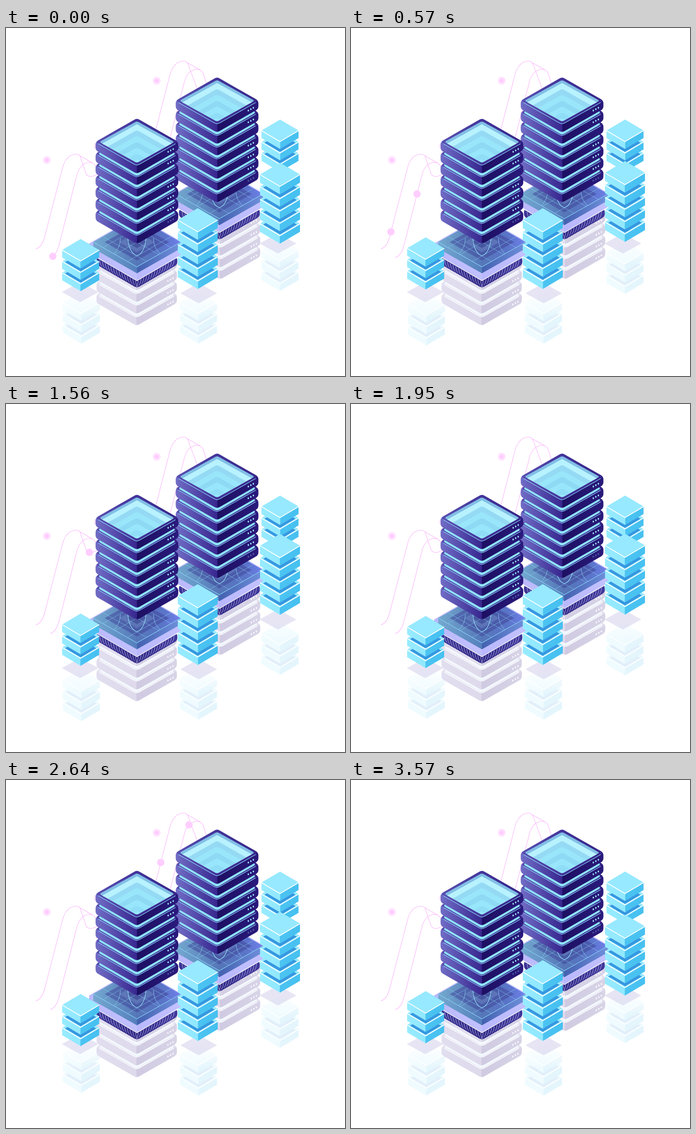
These frames come from a looping animation (738 px wide and 759 px high, 3.6 s). An HTML page:

```html
<!DOCTYPE html>
<html lang="en">
<head>
<meta charset="utf-8">
<title>Isometric servers</title>
<style>
  html, body { margin: 0; width: 100%; height: 100%; overflow: hidden; background: #fff; }
  svg { display: block; }
</style>
</head>
<body>
<svg id="stage" width="738" height="759" viewBox="0 0 738 759"></svg>
<script>
const LOOP = 3600, DOT_SPEED = 0.252, FLOOR_GAP = 25.5;
const stage = document.getElementById('stage');

// Horizontal gradients; two faces meet at a hard stop in the middle.
const gradient = (id, stops) => `<linearGradient id="${id}">` +
  stops.map(([at, color]) => `<stop offset="${at}" stop-color="${color}"/>`).join('') + '</linearGradient>';
const faces = (id, a, b, c, d) => gradient(id, [[0, a], [0.5, b], [0.5, c], [1, d]]);

const defs = `<defs>
  ${faces('cube', '#98ebff', '#90e8ff', '#4cc4f2', '#46c0f0')}
  ${faces('slab', '#716dc6', '#38278f', '#1d0f62', '#2a1a7c')}
  ${faces('ghost', '#e1deef', '#dedaec', '#cfcae1', '#d8d4e7')}
  ${faces('block', '#74a8d0', '#5580bd', '#4461b0', '#6f90dc')}
  ${faces('plate', '#bab8fb', '#c1c0ff', '#b9b8ff', '#c4c2ff')}
  ${faces('socket', '#3d3698', '#2c247f', '#2e2784', '#40389c')}
  ${gradient('rim', [[0, '#5a50b0'], [0.5, '#43349b'], [1, '#352589']])}
  ${gradient('deck', [[0, '#73a9cf'], [0.5, '#5577b8'], [0.8, '#5a74c8'], [1, '#7080ec']])}
  <linearGradient id="fade" x2="0" y2="1">
    <stop offset="0" stop-color="#fff"/><stop offset="1" stop-color="#fff" stop-opacity="0"/>
  </linearGradient>
  <clipPath id="glass"><path d="${diamond(0, 0, 82, 45.5, 5)}"/></clipPath>
</defs>`;

// Closed polygon with corners rounded over r pixels.
function polygon(points, r = 0) {
  if (!r) return 'M' + points.join('L') + 'Z';
  const toward = ([x, y], [u, v]) => {
    const k = r / Math.hypot(u - x, v - y);
    return [x + (u - x) * k, y + (v - y) * k];
  };
  const n = points.length;
  return points.map((p, i) =>
    `${i ? 'L' : 'M'}${toward(p, points[(i + n - 1) % n])}Q${p} ${toward(p, points[(i + 1) % n])}`).join('') + 'Z';
}
function diamond(x, y, w, h, r) {
  return polygon([[x - w, y], [x, y - h], [x + w, y], [x, y + h]], r);
}
const fill = (d, color, more = '') => `<path d="${d}" fill="${color}" ${more}/>`;
const line = (d, color, width, more = '') =>
  `<path d="${d}" fill="none" stroke="${color}" stroke-width="${width}" ${more}/>`;
const prism = (x, y, w, h, t, paint, r) => fill(polygon(
  [[x - w, y], [x, y - h], [x + w, y], [x + w, y + t], [x, y + h + t], [x - w, y + t]], r), paint);
const frontEdge = (x, y, w, h, r = 0) => {
  const k = h / w;
  return `M${x - w + r} ${y + r * k}L${x - r} ${y + h - r * k}Q${x} ${y + h} ${x + r} ${y + h - r * k}L${x + w - r} ${y + r * k}`;
};
const move = (x, y, body) => `<g transform="translate(${x} ${y})">${body}</g>`;

function cubes(x, top, w, count) {
  const h = w * 0.592, t = w * 0.4, step = w * 0.617;
  let out = '';
  for (let i = count - 1; i >= 0; i--) {
    const y = top + h + i * step;
    out += prism(x, y, w, h, t, 'url(#cube)') + fill(diamond(x, y, w, h), '#97e9ff');
    if (i) out += fill(diamond(x, y + 1.5, w * 0.84, h * 0.84), '#3797e0');
    out += line(frontEdge(x, y, w, h), '#fff', 1.8);
  }
  return out;
}

function leds(y, color, opacity) {
  return [68, 73.5, 79].map((x, i) =>
    `<ellipse cx="${x}" cy="${y - i * 3}" rx="1.5" ry="2" fill="${color}" opacity="${opacity}"/>`).join('');
}

function tower() {
  const w = 90, h = 51.5;
  let out = '';
  for (let i = 6; i >= 0; i--) {
    const y = i * FLOOR_GAP;
    out += prism(0, y, w, h, 18, 'url(#slab)', 6) + fill(diamond(0, y, w, h, 6), 'url(#rim)');
    if (i) out += fill(diamond(0, y, 85, 49.5, 6), '#8fe4fd');
    out += line(frontEdge(0, y + 0.5, w, h, 6), '#8bd9fa', 1.2);
    if (i !== 2) out += leds(y + 21.5, '#a5efff', i === 6 ? 0.35 : 1);
  }
  let inside = fill(diamond(0, 0, 82, 45.5), '#82bfe6') + fill(diamond(0, 7, 82, 45.5), '#b8f2ff');
  for (let k = 1; k < 4; k++) {
    const y = k * FLOOR_GAP;
    inside += fill(diamond(0, y, w, h, 6), '#86d0ef', `opacity="${0.85 - k * 0.15}"`) +
      fill(diamond(0, y + 9, 86, 48, 6), '#9ae9fd', 'opacity=".85"');
  }
  return out + `<g clip-path="url(#glass)">${inside}</g>`;
}

function towerGhost() {
  const w = 87.5, h = 50;
  let out = '';
  for (let k = 0; k < 5; k++) {
    const y = -k * FLOOR_GAP;
    out += prism(0, y, w, h, 18, 'url(#ghost)', 6) + fill(diamond(0, y, w, h, 6), '#e6e3f1') +
      fill(diamond(0, y, 83, 48, 6), '#f3f8fd') + line(frontEdge(0, y, w, h, 6), '#fff', 1.3) +
      leds(y + 21.5, '#fff', 0.9);
  }
  return out;
}

function base() {
  let out = prism(0, 34, 88, 51, 15, 'url(#socket)', 6);
  for (let i = 0; i < 14; i++) {
    for (const side of [-1, 1]) {
      const x = side * (3 + i * 6), y = 84 - i * 3.45;
      out += line(`M${x} ${y}q${-side} 10 ${-side * 5} 14`, '#dcd8ff', 0.8);
      if (i < 11) out += line(`M${x - side * 5} ${y + 16}q${-side * 2} 7 ${-side * 6} 13`, '#fff', 0.8, 'opacity=".5"');
    }
  }
  out += prism(0, 3, 104, 60, 20, 'url(#plate)') +
    line('M-88 33L0 84L88 33', '#fff', 1.6) +
    prism(0, 0, 95, 54, 14, 'url(#block)') + fill(diamond(0, 0, 95, 54), 'url(#deck)') +
    fill(diamond(0, 0, 70, 40), '#3e4298', 'opacity=".5"') +
    fill(diamond(0, 0, 38, 22), '#6e8cc6', 'opacity=".5"') +
    fill(diamond(0, 0, 22, 13), '#333a8c', 'opacity=".5"');
  let grid = '';
  for (const k of [0.22, 0.5, 0.78]) {
    const x = 95 * k, y = 54 * k;
    grid += `M${x - 95} ${y}L${x} ${y - 54}M${95 - x} ${y}L${-x} ${y - 54}`;
  }
  return out + line(grid, '#8cd3f2', 0.9, 'opacity=".65"') +
    line('M-20 -14C-20 8 -12 26 0 30C12 26 20 8 20 -14', '#93def8', 1.2) +
    line('M-36 -8Q-36 12 -50 25M36 -8Q36 12 50 25', '#93def8', 1, 'opacity=".8"') +
    line(frontEdge(0, 0, 95, 54), '#86cdf0', 1.2);
}

// Two pink curves, repeated behind each tower.
const upper = 'M65 482C74 479 80 471 84 456L123 305Q131 276 152 275Q157 275 161 279';
const lower = 'M96 501C105 498 111 490 115 475L154 322Q161 294 182 293Q191 294 195 301L207 340';
const upperLeft = upper + 'L173 314Q177 329 195 321L230 300';
const upperRight = upper + 'L184 340';
const curves = tail => line(`${tail}${lower}M161 279L188 294`, '#fbb8fb', 1.1);

const still = (x, y) => `<circle cx="${x}" cy="${y}" r="8.5" fill="#ffe1ff"/><circle cx="${x}" cy="${y}" r="4" fill="#ffcbff"/>`;
const shadow = (x, y) => fill(diamond(x, y, 40, 22), '#d3cfeb', 'opacity=".55"');
const ghost = (id, x, top) => `<g id="${id}" opacity=".14">${cubes(x, top, 40.3, 3)}</g>` +
  `<rect x="${x - 44}" y="${top - 4}" width="88" height="60" fill="url(#fade)"/>`;

const travellers = [
  { path: lower, start: 3575, x: 0, y: 0 },
  { path: upperLeft, start: 390, x: 0, y: 0 },
  { path: lower, start: 1787, x: 234, y: -203 },
  { path: upperRight, start: 2208, x: 234, y: -203 }
];

stage.innerHTML = defs +
  curves(upperLeft) + move(234, -203, curves(upperRight)) +
  still(89, 288) + still(328, 115) + still(200, 258) +
  travellers.map(() => '<circle class="dot" r="8" fill="#ffceff"/>').join('') +
  ghost('leftGhost', 164, 575) + ghost('midGhost', 419, 575) + ghost('rightGhost', 596.5, 460) +
  shadow(161.5, 576) + shadow(592, 470) + shadow(419.5, 578.5) +
  move(466, 480.5, towerGhost()) + move(464.5, 362, base()) + move(459.5, 158.5, tower()) +
  move(284.5, 581.5, towerGhost()) + move(285, 467, base()) + move(285, 248.5, tower()) +
  cubes(596.5, 200, 40.3, 3) +
  `<g id="right">${cubes(596.5, 294, 43.5, 5)}</g>` +
  `<g id="left">${cubes(162.5, 460.5, 40.3, 3)}</g>` +
  cubes(417.5, 393, 43.5, 5);

const dots = [...stage.querySelectorAll('.dot')];
travellers.forEach(dot => {
  dot.track = document.createElementNS('http://www.w3.org/2000/svg', 'path');
  dot.track.setAttribute('d', dot.path);
  dot.length = dot.track.getTotalLength();
});
const shift = (id, y) => document.getElementById(id).setAttribute('transform', `translate(0 ${y})`);

function draw(now) {
  const t = now % LOOP;
  const third = t / 1200;
  const bob = 8 * (third < 1 ? -third : third < 2 ? 2 * third - 3 : 3 - third);
  const rise = 1 - Math.abs(t / 1800 - 1);
  shift('left', bob);
  shift('leftGhost', -bob);
  shift('right', -12 * rise);
  shift('rightGhost', 20 * rise);
  travellers.forEach((dot, i) => {
    const along = (t - dot.start + LOOP) % LOOP * DOT_SPEED;
    const visible = along <= dot.length;
    dots[i].setAttribute('visibility', visible ? 'visible' : 'hidden');
    if (!visible) return;
    const p = dot.track.getPointAtLength(along);
    dots[i].setAttribute('cx', p.x + dot.x);
    dots[i].setAttribute('cy', p.y + dot.y);
  });
}

const began = performance.now();
function tick() {
  draw(performance.now() - began);
  requestAnimationFrame(tick);
}
tick();
</script>
</body>
</html>
```
